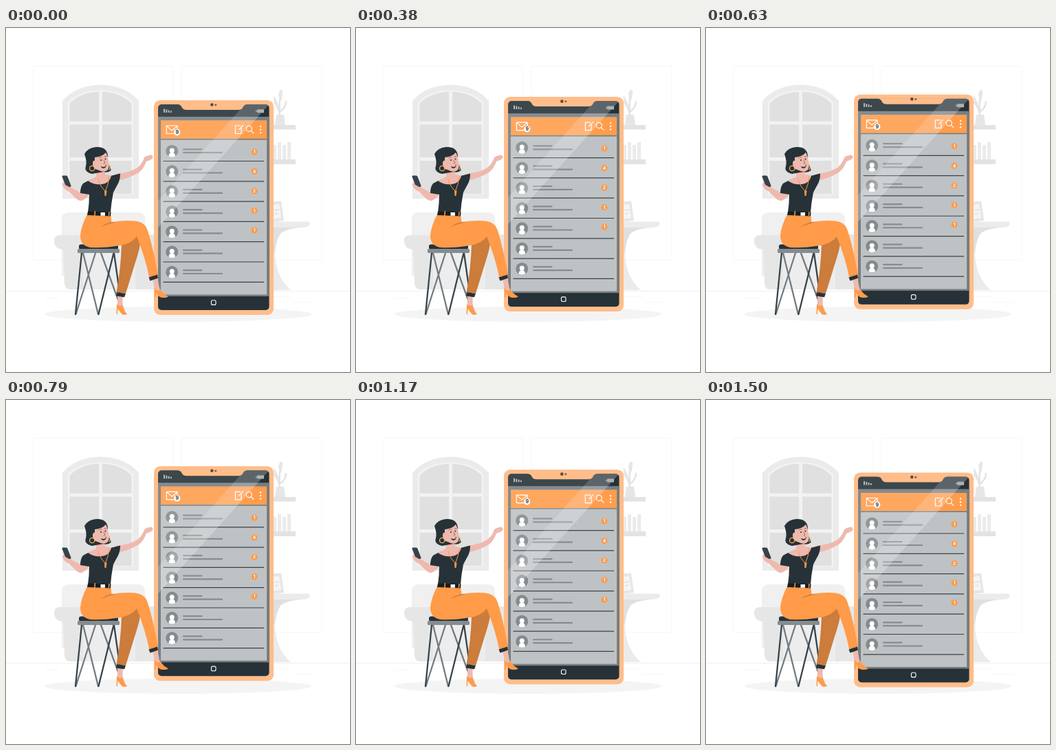
An HTML page that plays this animation: 500x500 px, repeating every 1540 ms.

```html
<!DOCTYPE html>
<html lang="en">
<head>
<meta charset="utf-8">
<title>Inbox</title>
<style>
  html, body { margin: 0; width: 100%; height: 100%; overflow: hidden; background: #fff; }
  svg { display: block; width: 100vw; height: 100vh; }
  text { font-family: Inter, "Open Sans", sans-serif; font-weight: 700; text-anchor: middle; }
  .line { fill: none; stroke-linecap: round; stroke-linejoin: round; }
  .skin { fill: #efb9ae; }
  .dark { fill: #263238; }
  .orange { fill: #ff9b49; }
</style>
</head>
<body>
<svg viewBox="0 0 500 500">
  <defs>
    <clipPath id="glass"><rect x="221" y="111" width="161.5" height="279"/></clipPath>
  </defs>

  <g id="room">
    <g fill="none" stroke="#f7f7f7">
      <rect x="39" y="55.5" width="204" height="282" rx="2"/>
      <rect x="255" y="55.5" width="204" height="282" rx="2"/>
    </g>
    <path d="M0 382.5H500" stroke="#ededed" stroke-width=".8"/>
    <path d="M389 390.5H414M417 398.5H448M56 392.5H78" stroke="#f5f5f5" stroke-width=".8"/>

    <!-- window -->
    <path d="M82 248V106Q102 83 137.500 82.500Q173 83 193 106V248Z" fill="#ebebeb"/>
    <path d="M90 242V108Q106 91 137.500 90.500Q169 91 185 108V242Z" fill="#f3f3f3"/>
    <path d="M92.500 241V110Q108 93 137.500 92.500Q167 93 182.500 110V241Z" fill="#e0e0e0"/>
    <path d="M137.500 92V241M92 138H183M92 190.500H183" stroke="#f2f2f2" stroke-width="5"/>

    <!-- armchair -->
    <path d="M81 310V278Q81 268 92 268H191Q202 268 202 278V360H81Z" fill="#f0f0f0"/>
    <path d="M104 300H215V380H104Z" fill="#ededed"/>
    <path d="M70 309Q70 301 79 301H103Q112 301 112 310V380H93Q86 380 85 371L83 322Q70 321 70 309Z" fill="#e6e6e6"/>
    <path d="M188 310Q188 301 197 301H220V380H188Z" fill="#e6e6e6"/>

    <!-- shelves, books, plant -->
    <path d="M380 141H421V147.500H380ZM380 191H421V198H380Z" fill="#e3e3e3"/>
    <path d="M386 170H393V191H386ZM395 166H400V191H395ZM402 170H407V191H402ZM409 166H414V191H409Z" fill="#ebebeb"/>
    <path d="M393 126H404L406 141H391Z" fill="#e6e6e6"/>
    <path d="M398 127Q397 117 390 108M398 122Q406 117 407 107M398 120Q396 105 401 92" class="line" stroke="#e3e3e3" stroke-width="2.500"/>
    <path d="M399 107Q393 94 400 89Q404 96 399 107ZM397 118Q388 110 389 98Q396 108 397 118Z" fill="#e6e6e6"/>

    <!-- side table and picture -->
    <path d="M383 253L400 251.500L404 280L386 282Z" fill="#e6e6e6"/>
    <path d="M387 257L397 256L400 276L389 277.500Z" fill="#f5f5f5"/>
    <path d="M390 265L397 264M391 270L396 269.500" stroke="#e3e3e3" stroke-width="2"/>
    <path d="M370 281.500H438Q443 281.500 441 286Q439 290 430 290H407Q394 300 391 325Q391 361 414 381H370Z" fill="#ebebeb"/>
    <path d="M370 290H430Q411 291 401 297Q393 303 391 326H370Z" fill="#e0e0e0"/>
    <ellipse cx="250" cy="416" rx="194" ry="11" fill="#f4f4f4"/>
  </g>

  <g id="phone">
    <rect x="215" y="105" width="174" height="312" rx="9" fill="#ffbd8a"/>
    <rect x="221" y="111" width="161.500" height="299" rx="5" class="dark"/>
    <rect x="221" y="129" width="161.500" height="261" fill="#777e82"/>
    <rect x="225" y="134.500" width="154" height="253" fill="#bec2c4"/>
    <rect x="225" y="134.500" width="154" height="26.500" fill="#ff9d4d"/>
    <path d="M225 161.700H379" stroke="#6e777b" stroke-width="1.400"/>
    <g id="rows"></g>
    <g clip-path="url(#glass)" fill="#fff">
      <path d="M221 111H382.500L221 290Z" opacity=".1"/>
      <path d="M347 111H382.500L221 290V251Z" opacity=".16"/>
    </g>
    <path d="M247 110.500Q253 110.500 255 114L256 116Q258 119 262 119H338Q342 119 344 116L345 114Q347 110.500 353 110.500Z" fill="#ffbd8a"/>
    <circle cx="299.300" cy="111.500" r="2.300" fill="#5f4a3e"/>
    <circle cx="304.800" cy="111.700" r="1.300" fill="#5f4a3e"/>

    <!-- status bar -->
    <path d="M229 117.500h2v5.500h-2zM232.300 118.500h2v4.500h-2zM235.600 119.500h2v3.500h-2zM238.900 120.500h2v2.500h-2z" fill="#b4b9bb"/>
    <rect x="365" y="118.300" width="10" height="5" rx=".6" fill="#abb1b4"/>
    <rect x="363" y="119.700" width="1.600" height="2.200" fill="#abb1b4"/>

    <!-- header icons -->
    <g class="line" stroke="#fff" stroke-width="1.200">
      <rect x="233.300" y="142" width="15.700" height="11.500" rx=".6"/>
      <path d="M233.500 142.500L241.200 149L248.800 142.500"/>
      <path d="M340.500 142H333.300V153.500H342V146M338.700 147.500L344.600 141.500"/>
      <circle cx="353.200" cy="146.300" r="4.100"/>
      <path d="M356.200 149.400L360 153"/>
    </g>
    <circle cx="248.700" cy="151.600" r="4.700" fill="#fff"/>
    <text x="248.700" y="154.200" font-size="7" class="dark">9</text>
    <g fill="#fff">
      <circle cx="370" cy="143" r="1.200"/><circle cx="370" cy="147.700" r="1.200"/><circle cx="370" cy="152.400" r="1.200"/>
    </g>
    <rect x="298.400" y="395.800" width="6.600" height="6.600" rx="2" fill="none" stroke="#fff" stroke-width="1.100"/>
  </g>

  <g id="stool">
    <g class="line" stroke-width="2.300">
      <path d="M130 327L101.500 416M112 327L134 416M138 327L164 398" stroke="#737b80"/>
      <path d="M110 327L101 416M156.500 327L134.500 416M157 327L167 398" stroke="#37434a"/>
    </g>
    <rect x="106" y="314.500" width="57" height="7.500" rx="3" class="dark"/>
    <rect x="104" y="321" width="61" height="6" rx="1.500" fill="#858c90"/>
  </g>

  <g id="woman">
    <!-- far leg -->
    <path d="M163 389L170 390Q169 398 170 403L173 411L164 406Q160 401 163 389Z" class="skin"/>
    <path d="M161 401Q165 406 169 403Q171 411 176 415.500Q175 417.500 169 416.500Q165 412 162.500 408L162 416H160.500Z" class="orange"/>
    <path d="M168 313L196 300Q196 315 191 331L174 386L160.500 384Q167 350 168 313Z" fill="#cc7c3b"/>
    <path d="M161 384L174 386L172 391.300L160 389.500Z" class="dark"/>

    <!-- near leg -->
    <path d="M213 366L220.500 364.500L223 378L230 388L218 386Q216 376 213 366Z" class="skin"/>
    <path d="M216 378Q220 384 224 380Q229 387 235.500 390Q235 392.500 227 392Q221 391 218 384L217.500 392H216Z" class="orange"/>
    <path d="M118 271H152L153.500 282Q173 279 188 280.500Q201 282 205 292Q212 311 221 359L208.500 364Q203 335 190 303Q181 315 160 317Q142 320 122 319Q108 316 108 302Q109 288 118 271Z" class="orange"/>
    <path d="M153 282Q145 284 137 289Q148 285 159 282" fill="#cc7c3b"/>
    <path d="M207.500 362.500L220 358.500L221 363.500L209.500 367.500Z" class="dark"/>

    <!-- arms -->
    <path d="M159 212Q178 211 191 203Q197 198 200 191Q201 186 207 185.500Q212 183 213.500 187Q214 190 209 192L204 194Q200 205 193 210Q180 218 162 222Z" class="skin"/>
    <path d="M110 229L122 238Q120 246 112 250Q107 253 102 248L92 238Q84 235 82 228Q82 224 87 225L95 232L108 239Z" class="skin"/>
    <path d="M81.500 216Q81 214.500 83 214.500L87.500 214.500Q89 214.500 89.500 216L94.500 229Q95 231 93 231L88.500 230.500Q87 230 86.500 229Z" fill="#37434a"/>
    <path d="M83 226Q86 228 90 230L93 233L88 235Z" class="skin"/>

    <!-- top -->
    <path d="M112 226Q122 220 131 218L152 215L166 211.500Q166 220 163 226Q159 233 156 239Q153 254 152 268H119Q121 255 121 242L108 240Q108 231 112 226Z" class="dark"/>
    <path d="M119 222Q126 219 131 216V204H144V213Q149 213 153 215Q151 223 144 226Q130 230 119 222Z" class="skin"/>
    <path d="M134 220Q137 231 144.500 237Q149 227 150 216" class="line" stroke="#ff9b49" stroke-width="1"/>
    <path d="M143 236.500H146.500L145.500 244H143.500Z" class="orange"/>

    <!-- belt -->
    <path d="M119 266.500L152.500 267.500L152 273.500L118 272Z" fill="#171e22"/>
    <path d="M129.500 266L128.800 273M150 267L149.500 273" stroke="#ff9b49" stroke-width="1.500"/>
    <rect x="137.500" y="268" width="6.500" height="4.800" fill="#fff"/>

    <!-- head -->
    <path d="M114 183Q119 174 131 173Q146 172 148 185L147 196Q153 203 152.500 207Q148 211 142 209L125 212Q113 209 116 201Q118 194 114 183Z" class="dark"/>
    <path d="M129 188Q140 187 145 181Q148 186 149 194Q151 204 147 207Q142 211 133 206Q127 205 126 198Q126 192 129 193Z" class="skin"/>
    <circle cx="138" cy="192" r="1" class="dark"/>
    <circle cx="144.500" cy="190.500" r="1" class="dark"/>
    <path d="M135 189Q137 187 139 188M143 187L146 186.500M142 192L144 196L142 197" class="line" stroke="#76504a" stroke-width=".7"/>
    <path d="M138 201Q142 202 145.500 198.500Q146 203 142 204Q139 204 138 201Z" class="dark"/>
    <path d="M139.500 201.300Q142 201.500 144.700 199.600L144.500 201Q142 202.500 139.500 201.300Z" fill="#fff"/>
    <g class="line" stroke="#ffb259" stroke-width="1.200">
      <circle cx="125.200" cy="204" r="3.700"/>
      <path d="M149 198Q153 201 150 206"/>
    </g>
  </g>
</svg>
<script>
  const LOOP = 1540, FPS = 24, STEPS = 37, RISE = 10, LEAD = 40;
  const counts = [1, 4, 2, 1, 1];

  const row = i => {
    const y = i * 29.3;
    const n = counts[i];
    const by = 180 + i * 28.5;
    const badge = n ? `<circle cx="361" cy="${by}" r="4.5" class="orange"/>
      <text x="361" y="${by + 2.2}" font-size="6" fill="#fff">${n}</text>` : "";
    return `<g transform="translate(0 ${y})">
      <circle cx="241.200" cy="179" r="9" fill="#858a8c"/>
      <circle cx="241.200" cy="178" r="3.500" fill="#fff"/>
      <path d="M236.500 186.700Q236.300 181 241.200 181Q246.100 181 245.900 186.700Q241.200 189 236.500 186.700Z" fill="#fff"/>
      <path d="M258 176.300H284.500M258 181.200H314" stroke="#878c8e" stroke-width="2.200" stroke-linecap="round"/>
      <path d="M228.500 193.500H375" stroke="#37434a" stroke-width="1.200"/>
    </g>${badge}`;
  };
  document.getElementById("rows").innerHTML = Array.from({ length: 7 }, (_, i) => row(i)).join("");

  const phone = document.getElementById("phone");
  const start = performance.now();

  // Triangle wave: steady climb, steady descent.
  const lift = t => 1 - Math.abs(1 - 2 * (((t + LEAD) % LOOP) / LOOP));

  function draw(now) {
    const t = Math.max(0, now - start) % LOOP;
    const step = Math.min(STEPS - 1, Math.floor((t + 5) * FPS / 1000));
    const y = 0.5 - RISE * lift(step * LOOP / STEPS);
    phone.setAttribute("transform", `translate(0 ${y.toFixed(3)})`);
    requestAnimationFrame(draw);
  }
  draw(start);
</script>
</body>
</html>
```
